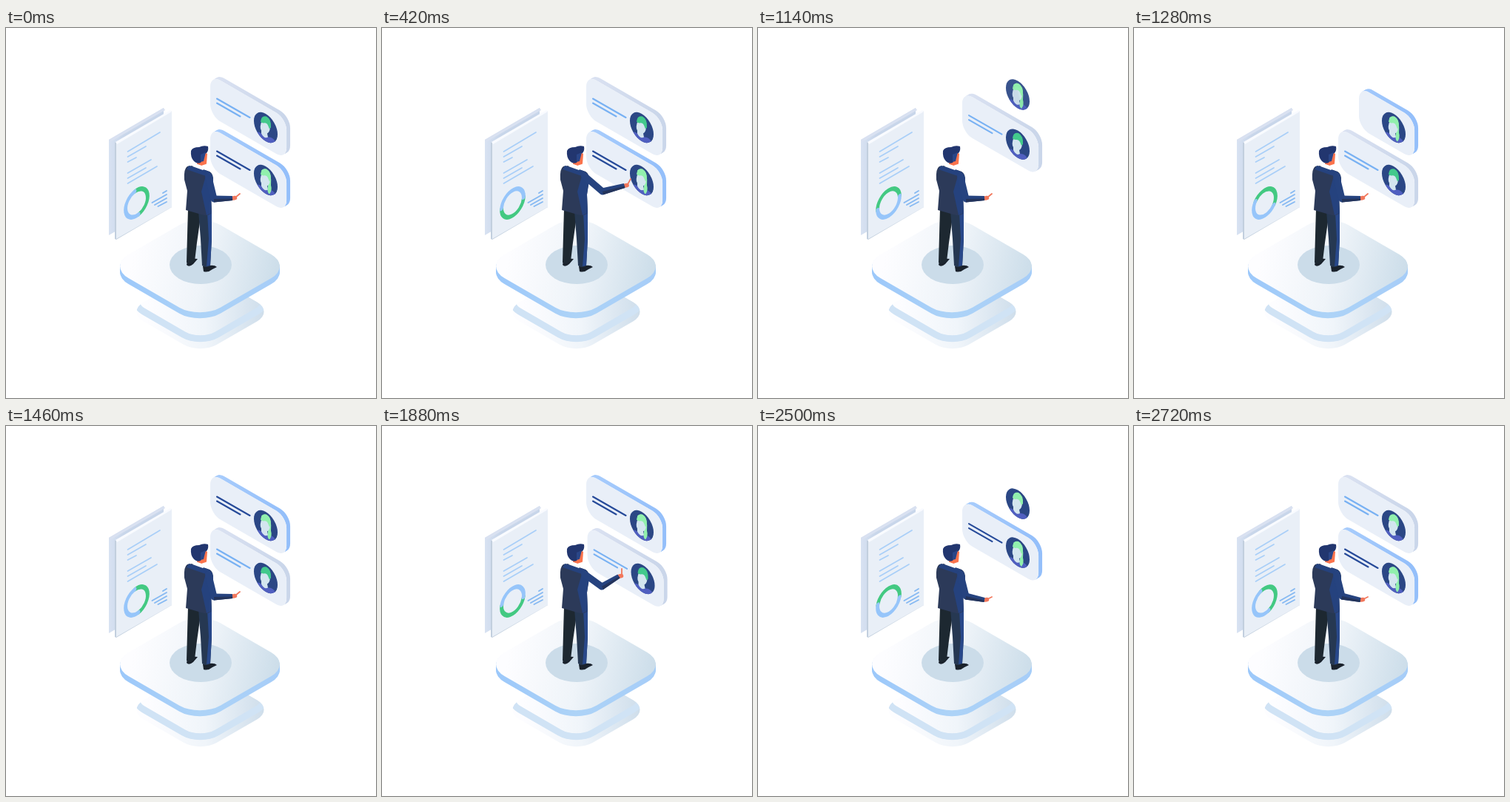
Write an HTML page with a canvas that moves like this. It is 500x500 px and loops after 2740 ms.

```html
<!DOCTYPE html>
<html lang="en">
<head>
<meta charset="utf-8">
<style>
html, body { margin: 0; width: 100%; height: 100%; overflow: hidden; background: #fff; }
canvas { display: block; }
</style>
</head>
<body>
<canvas id="stage" width="500" height="500"></canvas>
<script>
const ctx = document.getElementById('stage').getContext('2d');
const LOOP = 2740, SLOT = 71;
const COS = Math.sqrt(3) / 2;

const clamp = p => Math.max(0, Math.min(1, p));
const smooth = p => p * p * (3 - 2 * p);
const cubic = p => p < .5 ? 4 * p ** 3 : 1 - 4 * (1 - p) ** 3;
const span = (t, start, length) => clamp((t - start) / length);

// Each key is [time, ...values].
function track(keys, t, ease = smooth) {
  let i = 1;
  while (i < keys.length - 1 && t > keys[i][0]) i++;
  const [a, b] = [keys[i - 1], keys[i]];
  const p = ease(span(t, a[0], b[0] - a[0]));
  return a.slice(1).map((v, k) => v + (b[k + 1] - v) * p);
}

function shape(d, fill) {
  ctx.fillStyle = fill;
  ctx.fill(new Path2D(d));
}

function line(color, width, ...points) {
  ctx.beginPath();
  for (let i = 0; i < points.length; i += 2) ctx.lineTo(points[i], points[i + 1]);
  ctx.strokeStyle = color;
  ctx.lineWidth = width;
  ctx.lineCap = ctx.lineJoin = 'round';
  ctx.stroke();
}

function within(draw) {
  ctx.save();
  draw();
  ctx.restore();
}

function gradient(x1, y1, x2, y2, ...colors) {
  const g = ctx.createLinearGradient(x1, y1, x2, y2);
  colors.forEach((c, i) => g.addColorStop(i / (colors.length - 1), c));
  return g;
}

// Rounded square lying on the floor plane.
function slab(x, y, half, radius, fill) {
  ctx.beginPath();
  within(() => {
    ctx.transform(COS, .5, -COS, .5, x, y);
    ctx.roundRect(-half, -half, 2 * half, 2 * half, radius);
  });
  ctx.fillStyle = fill;
  ctx.fill();
}

function platforms() {
  const lower = gradient(190, 0, 348, 0, '#fdfdff', '#f0f5fa', '#cfdeeb');
  within(() => {
    slab(262.5, 383.5, 57.3, 26, lower);
    ctx.clip();
    slab(262.5, 370, 57.3, 26, lower);
    ctx.strokeStyle = '#d0e3f5';
    ctx.stroke();
  });
  const side = gradient(154, 0, 370, 0, '#9cc8fa', '#add3f7', '#a6cdf8');
  for (let y = 330; y > 322; y--) slab(262, y, 71.7, 32, side);
  slab(262, 322, 71.7, 32, gradient(175, 290, 365, 330, '#fdfdff', '#eff4f9', '#cddeea'));
  ctx.beginPath();
  ctx.ellipse(263, 320, 42, 26, 0, 0, 2 * Math.PI);
  ctx.fillStyle = '#cbdce9';
  ctx.fill();
}

function donut(t) {
  const turn = track([[0, -10], [740, 172], [1140, 267], [1460, 350],
    [1880, 460], [2320, 595], [2740, 703]], t, p => p)[0] * Math.PI / 180;
  within(() => {
    ctx.transform(COS, -.5, 0, 1, 176.5, 236.5);
    ctx.lineWidth = 5.6;
    ['#43c982', '#96c5fa'].forEach((color, i) => {
      ctx.beginPath();
      ctx.arc(0, 0, 17.2, turn + (i - .5) * Math.PI, turn + (i + .5) * Math.PI);
      ctx.strokeStyle = color;
      ctx.stroke();
    });
  });
}

function documents(t) {
  shape('M139 151L213 108V237L139 280Z', gradient(139, 0, 160, 0, '#d8e2f2', '#c8d6ea'));
  shape('M139 151L213 108L215 111L141 154Z', '#d9e1f1');
  shape('M147 155L222 112L224 113V242L149 286L147 285Z', '#c2cfde');
  shape('M149 155L224 112V242L149 285Z', '#e9eff7');
  shape('M148 154L222 111L224 113L150 157Z', '#f9fbff');
  const text = [[167, 208, 141], [174, 189, 160], [181, 176, 175],
    [196, 196, 178], [203, 189, 189], [210, 204, 187]];
  for (const [y, x2, y2] of text) line('#a9cff8', 1.7, 164.5, y, x2, y2);
  for (const [x, y, y2] of [[212, 223, 220], [197.5, 236, 225], [201, 239, 230], [205.5, 241, 235]])
    line('#86b9f2', 1.9, x, y, 217, y2);
  donut(t);
}

function avatar(x, y, dark, bright) {
  within(() => {
    ctx.beginPath();
    within(() => {
      ctx.transform(COS, .5, 0, 1, x, y);
      ctx.arc(0, 0, 18.5, 0, 2 * Math.PI);
    });
    ctx.fillStyle = '#2b4785';
    ctx.fill();
    ctx.clip();
    ctx.translate(x, y);
    shape('M-16 6Q-9 5 -5 9L4 13Q12 13 15 24H-16Z', '#505fc0');
    if (dark) shape('M-6 -13Q1 -19 6 -8Q8 0 7 7Q9 14 5 19Q1 16 3 8L0 -5Z', '#91f0ad');
    shape('M-5 -10Q4 -11 6 -2Q6 6 2 8L3 13Q-2 16 -6 8V4Q-9 0 -5 -10Z', '#d3e5ef');
    shape('M-7 -8Q-6 -17 1 -15Q8 -11 7 0L5 2L3 -3Q1 -7 -3 -6Q-6 -6 -7 -8Z',
      dark || bright ? '#91f0ad' : '#43c98c');
  });
}

// Panel on the right wall; "open" widens it from the avatar to full length.
function card(dark, x, y, { open = 1, alpha = 1, bright = false, avatarY = 0 } = {}) {
  within(() => {
    ctx.globalAlpha = alpha;
    ctx.translate(276 + x, 63 + y);
    if (open > 0) within(() => {
      const opacity = alpha * clamp(open * 3);
      const left = 66 * (1 - open);
      const face = (dx, dy, fill, faceAlpha) => within(() => {
        ctx.globalAlpha = faceAlpha;
        ctx.transform(COS, .5, 0, 1, dx, dy);
        ctx.beginPath();
        ctx.roundRect(left, 0, 119 - left, 55.5, 16);
        ctx.fillStyle = fill;
        ctx.fill();
      });
      const side = dark ? gradient(0, 0, 108, 0, '#a9cdfc', '#94bffa')
                        : gradient(0, 0, 108, 0, '#dbe2f2', '#cad6ea');
      for (let i = 5; i > 0; i--) face(i, -.6 * i, side, opacity);
      // White backing keeps the side from showing through a fading face.
      face(0, 0, '#fff', 1);
      face(0, 0, '#e9eff8', opacity);
      ctx.globalAlpha = opacity * span(open, .6, .4);
      const ink = dark ? '#264a99' : '#78b1f3';
      line(ink, 2.1, 9, 32.5, 53.5, 58);
      line(ink, 2.1, 9, 38.5, 40.5, 56.5);
    });
    avatar(75, 71.5 + avatarY, dark, bright);
  });
}

function cards(t) {
  const first = t < 1640;
  const start = first ? 1055 : 2400;
  const [shift, alpha] = first
    ? track([[550, 0, 1], [610, 10, 1], [740, -85, .82], [840, -118, 0]], t)
    : track([[1860, 0, 1], [1890, 2, 1], [2060, 80, 0]], t);
  if (alpha > 0) card(first, shift, SLOT + shift * .6, { alpha });
  card(!first, 0, SLOT * cubic(span(t, start, 200)));
  const fall = span(t, start + 30, 120);
  if (fall > 0) card(first, 0, 0, {
    open: smooth(span(t, start + 150, 150)),
    alpha: clamp(fall * 2),
    bright: !first,
    avatarY: -81 * (1 - smooth(fall))
  });
}

function arm(t) {
  const rest = [281, 231, 306, 230, 316, 224];
  const low = [281, 230, 306, 235, 316, 231];
  const reach = [303, 218, 334, 208, 342, 198];
  const [ex, ey, wx, wy, fx, fy] = track([
    [0, ...rest], [200, ...rest], [520, ...reach], [610, ...reach],
    [740, 286, 230, 312, 220, 319, 212], [880, ...rest], [1640, ...rest],
    [1880, 297, 217, 320, 203, 324, 193], [1990, ...reach], [2240, ...low], [2740, ...low]
  ], t);
  const length = Math.hypot(wx - ex, wy - ey);
  const nx = -(wy - ey) / length, ny = (wx - ex) / length;
  const sleeve = (near, far, endNear, endFar, fill) => shape(
    `M${ex + nx * near} ${ey + ny * near}L${wx + nx * endNear} ${wy + ny * endNear}` +
    `L${wx + nx * endFar} ${wy + ny * endFar}L${ex + nx * far} ${ey + ny * far}Z`, fill);
  line('#f2785c', 5.5, wx + 1, wy, wx + 3.5, wy - .5);
  line('#f2785c', 1.8, wx + 4, wy - 1, fx, fy);
  line('#26437f', 9, 273.5, 200, ex, ey);
  sleeve(-4.5, 4.5, -3, 3, '#26437f');
  sleeve(0, 4.5, .5, 3, '#24345b');
}

function man(t) {
  shape('M246 311L244 320Q247 324 253 319L259 312Z', '#1a222c');
  shape('M266 322L267 329Q273 331 279 326L285 323Q282 320 275 321Z', '#1a222c');
  shape('M246 244L264 248L258 290L255 315Q249 320 244 317L245 280Z', '#1d2831');
  shape('M260 247L278 248L278 285L276 321Q270 325 265 321L263 285Z', '#263852');
  shape('M272 249H278V285L276 321L271 322L274 285Z', '#28488a');
  shape('M259 175L266 166L272 170L271 183Q269 187 264 186L258 184Z', '#fa734c');
  shape('M253 186L266 191L272 193Q279 194 280 203L277 225L278 250Q273 255 264 252L243 246' +
    'L245 220L241 205Q240 190 245 187Z', '#2c3a59');
  shape('M247 186L266 191L272 193Q280 195 280 207L277 225L278 250L271 253L264 221L270 200L244 191Z', '#25427e');
  shape('M253 182L264 186L270 184L270 189L266 192L252 187Z', '#fff');
  arm(t);
  shape('M250 166Q252 161 261 161Q267 158 273 160Q274 166 271 169L267 170L266 177L263 182' +
    'Q258 184 254 180Q249 175 250 166Z', '#22366f');
  shape('M263 171L270 168L267 180L263 181Z', '#2a4688');
}

function draw() {
  const t = performance.now() % LOOP;
  ctx.fillStyle = '#fff';
  ctx.fillRect(0, 0, 500, 500);
  platforms();
  cards(t);
  documents(t);
  man(t);
  requestAnimationFrame(draw);
}
draw();
</script>
</body>
</html>
```
